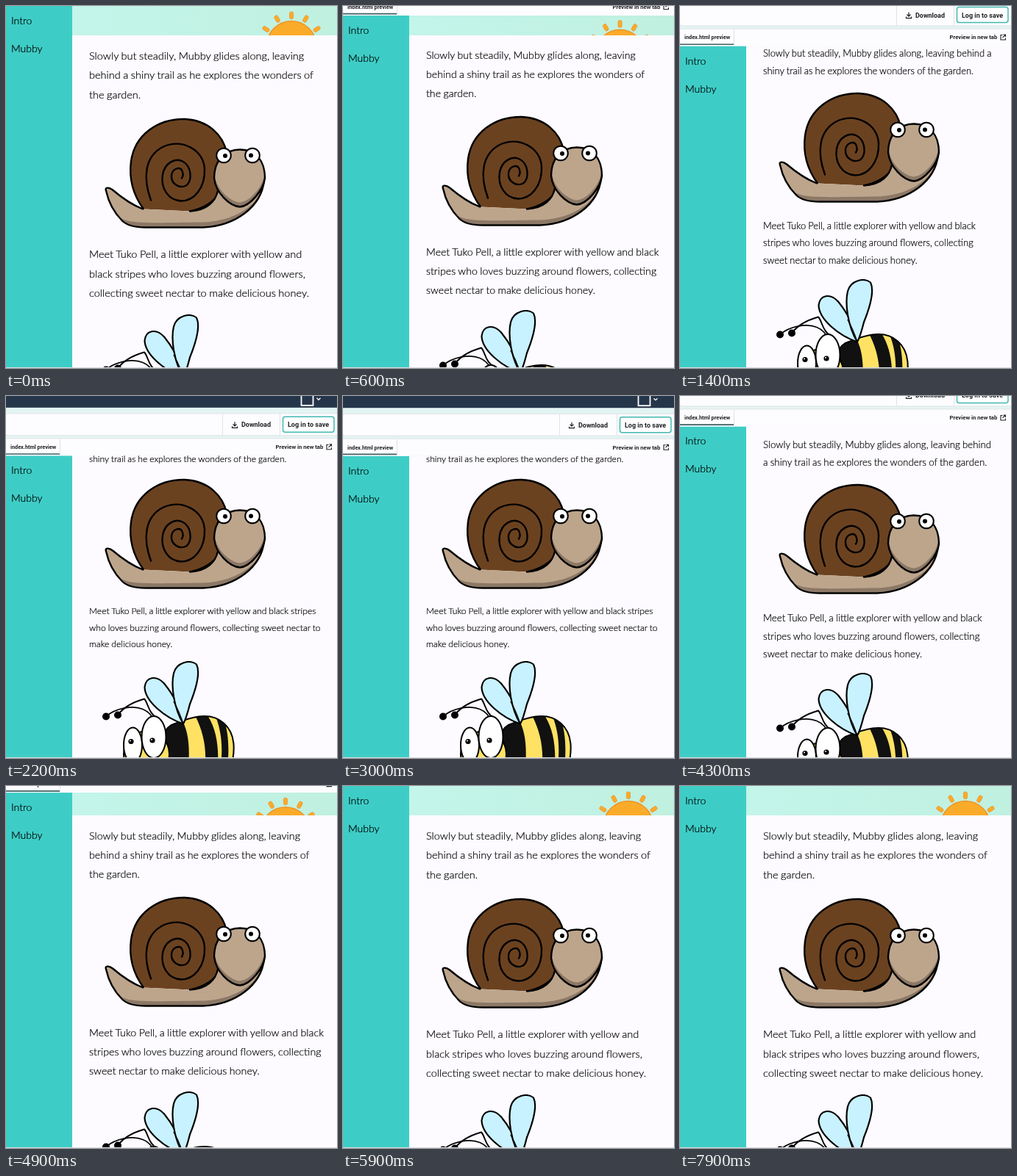
An HTML page for the animation above (8000 ms loop, 450 by 493 pixels).

```html
<!DOCTYPE html>
<html lang="en">
<head>
<meta charset="utf-8">
<title>Garden page preview</title>
<style>
  html, body { margin: 0; width: 100%; height: 100%; overflow: hidden; }
  #stage { position: relative; width: 450px; height: 493px; overflow: hidden; background: #fdfbff; }
  #stage > * { position: absolute; }
  svg { display: block; }
  #banner { left: 90px; top: 0; }
  #story { left: 113px; top: 40px; width: 319px; }
  #story p, nav span { font-family: Lato, sans-serif; font-weight: 300; color: #000; -webkit-text-stroke: .2px #000; }
  #story p { margin: 1.017em 0; font-size: 1em; line-height: 1.83; word-spacing: -.03em; }
  nav { left: 0; top: 0; width: 90px; height: 493px; background: #3ecdc6; }
  nav span { position: absolute; left: 7px; font-size: 14px; line-height: 20px; }
  #editor { left: 0; top: -100px; }
  #editor text { font-family: Roboto, sans-serif; font-weight: 700; fill: #1f2226; }
  #edge { left: 0; bottom: 0; width: 450px; height: 1px; background: #dcdde2; }
</style>
</head>
<body>
<div id="stage">
  <svg id="banner" width="360" height="40" viewBox="90 0 360 40">
    <defs>
      <linearGradient id="mint">
        <stop offset="0" stop-color="#c3f5ea"/>
        <stop offset="1" stop-color="#c0f0df"/>
      </linearGradient>
    </defs>
    <rect x="90" width="360" height="40" fill="url(#mint)"/>
    <g id="sun" fill="#fbab2a" stroke="#ef9426"></g>
  </svg>

  <div id="story">
    <p>Slowly but steadily, Mubby glides along, leaving behind a shiny trail as he explores the wonders of the garden.</p>
    <svg width="319" height="161" viewBox="113 149.5 319 161" stroke="#000" stroke-width="2.4" stroke-linejoin="round" stroke-linecap="round" fill="none">
      <path fill="#6b4220" d="M187 277C173 258 167 235 170 212C175 176 206 154 243 154.500C275 156 295 176 300 200C304 242 290 272 250 280"/>
      <path fill="#bda58c" stroke="none" d="M136 252C134 247 140 247 145 251C158 262 170 271 186 277L250 280C274 279 287 264 288 246L351 238C347 274 312 300 268 302H190C176 302 165 300 158 293C146 281 139 266 136 252Z"/>
      <path fill="#8c7866" stroke="none" d="M155 289C170 297 190 296 268 295C300 294 328 281 342 262C330 287 303 300 268 301H190C176 301 164 299 155 289Z"/>
      <path d="M186 277C170 271 158 262 145 251C140 247 134 247 136 252C139 266 146 281 158 293C165 300 176 302 190 302H268C312 300 347 274 351 238"/>
      <path d="M250 280C274 279 285 266 288 252"/>
      <path d="M197 265C186 235 188 205 214 192C240 181 268 196 270 222C271 248 256 266 238 266C220 265 210 248 213 230C216 214 230 207 240 212C252 218 254 238 245 245C235 250 224 242 225 231C226 222 236 219 239 224C241 228 241 232 239 235"/>
      <path fill="#8c7866" d="M283 235C283 210 298 196 318 196C340 196 352 212 352 235C350 251 332 273 318 274C304 273 285 255 283 235Z"/>
      <path fill="#bda58c" stroke="none" d="M284.500 234C284.500 211 299 197.500 318 197.500C339 197.500 350.500 212 350.500 233C348 248 331 267 318 268C305 267 287 251 284.500 234Z"/>
      <g fill="#fff" stroke-width="2">
        <circle cx="296" cy="204" r="9.800"/><circle cx="335" cy="204" r="9.800"/>
      </g>
      <g fill="#000" stroke="none">
        <circle cx="298" cy="204.500" r="3"/><circle cx="333" cy="204" r="3"/>
      </g>
    </svg>
    <p>Meet Tuko Pell, a little explorer with yellow and black stripes who loves buzzing around flowers, collecting sweet nectar to make delicious honey.</p>
    <svg width="319" height="150" viewBox="113 361.5 319 150" stroke="#000" stroke-width="2" stroke-linejoin="round" stroke-linecap="round" fill="none">
      <defs>
        <path id="body" d="M208 515C208 475 212 456 224 449C240 443 274 426 296 446C312 460 313 482 304 515Z"/>
        <clipPath id="inBody"><use href="#body"/></clipPath>
      </defs>
      <use href="#body" fill="#ffe263" stroke="none"/>
      <g clip-path="url(#inBody)" stroke="none" fill="#111">
        <path d="M200 440H238C248 455 251 480 247 515H200Z"/>
        <path d="M254 430H270C286 450 291 480 287 515H270C274 480 268 455 254 430Z"/>
        <path d="M282 430H292C304 455 304 485 300 515H290C296 485 294 455 282 430Z"/>
      </g>
      <use href="#body"/>
      <circle cx="191" cy="488" r="31" fill="#ffe263"/>
      <g stroke-width="1.600">
        <path d="M136 437C148 426 172 421 186 427C196 431 200 438 203 446"/>
        <path stroke-width="2" d="M152 435C160 424 174 417 188 413C194 419 192 433 210 442"/>
      </g>
      <g fill="#000" stroke="none">
        <circle cx="136" cy="437" r="5"/><circle cx="152" cy="435" r="5"/>
      </g>
      <g fill="#c8f2ff" stroke-width="2.200">
        <path d="M241 447C215 438 189 416 188.500 397C190 383 204 380 215 392C228 408 238 428 241 447Z"/>
        <path d="M241 447C228 425 224 395 228 378C232 363 250 359 259 366C265 378 258 400 250 420C247 432 245 440 241 447Z"/>
      </g>
      <path stroke-width="1.200" d="M228 417C234 427 238 437 241 447"/>
      <g fill="#fff">
        <ellipse cx="172.500" cy="476" rx="12.500" ry="24"/>
        <ellipse cx="201" cy="465" rx="16.500" ry="28.500"/>
      </g>
      <g fill="#000" stroke="none">
        <circle cx="170" cy="471" r="3.600"/><circle cx="199" cy="469.500" r="3.600"/>
      </g>
      <g fill="#fff" stroke="none">
        <circle cx="169" cy="470" r="1"/><circle cx="198" cy="468.500" r="1"/>
      </g>
    </svg>
  </div>

  <nav><span style="top:10px">Intro</span><span style="top:48px">Mubby</span></nav>

  <svg id="editor" width="450" height="100" viewBox="0 -100 450 100" fill="none">
    <rect y="-100" width="450" height="100" fill="#e3f5f2"/>
    <rect y="-100" width="450" height="34.500" fill="#26364a"/>
    <rect x="401.500" y="-84" width="16" height="15.500" stroke="#fff" stroke-width="1.800"/>
    <path d="M422.500 -78.500L425 -76L427.500 -78.500" stroke="#fff" stroke-width="1.300"/>
    <rect x="-.5" y="-57.500" width="460" height="30" rx="3" fill="#fdfcfe" stroke="#dfe3e6"/>
    <path d="M294.500 -57V-28M372.500 -57V-28" stroke="#e1e3e7"/>
    <rect x="376.500" y="-53" width="69.500" height="21" rx="3" fill="#fff" stroke="#42b9b0" stroke-width="1.500"/>
    <path d="M311 -46V-40.500M308.500 -43L311 -40.500L313.500 -43M307.500 -40V-38H314.500V-40" stroke="#1f2226" stroke-width="1.200"/>
    <text x="320" y="-39" font-size="9">Download</text>
    <text x="383" y="-39" font-size="9">Log in to save</text>
    <rect y="-23.500" width="450" height="23.500" fill="#fdfcfe"/>
    <path d="M0 -23.500H450M73.500 -23V-1" stroke="#e1e3e7"/>
    <path d="M0 -2.300H73" stroke="#3d6065" stroke-width="1.700"/>
    <text x="6" y="-9.200" font-size="7.3">index.html preview</text>
    <text x="366.500" y="-9.200" font-size="7.7">Preview in new tab</text>
    <path d="M438.500 -15H436V-8.500H442.500V-11M439.500 -15.500H442.500V-12.500M442.500 -15.500L438.500 -11.500" stroke="#1f2226" stroke-width="1.100"/>
  </svg>
  <div id="edge"></div>
</div>

<script>
const LOOP = 8000, STEP = 100, VIEW = 493, PEAK = 81.7;
const [story, nav, editor, sun] =
  ['#story', 'nav', '#editor', '#sun'].map(s => document.querySelector(s));

sun.innerHTML = '<circle cx="388" cy="54" r="33.500" stroke-width="1.500"/>' +
  [-57, -28, 0, 28, 57].map(a =>
    `<rect x="385.500" y="8" width="5" height="9.500" rx="2" stroke-width=".8" transform="rotate(${a} 388 54)"/>`).join('');

const ease = (t, from, to) => {
  const u = Math.min(1, Math.max(0, (t - from) / (to - from)));
  return (1 - Math.cos(Math.PI * u)) / 2;
};

// Height of the editor chrome scrolled into view above the page.
const chromeAt = t => PEAK * (ease(t, 0, 2300) - ease(t, 3270, 5350));

function draw(now) {
  const t = Math.floor((now % LOOP) / STEP) * STEP;
  const top = chromeAt(t);
  const shift = `translateY(${top.toFixed(2)}px)`;
  nav.style.transform = editor.style.transform = shift;
  story.style.fontSize = (VIEW - top) * 0.0295 + 'px';
  sun.setAttribute('transform', `translate(${-0.88 * top} ${0.9 * top})`);
  requestAnimationFrame(draw);
}
draw(0);
</script>
</body>
</html>
```
